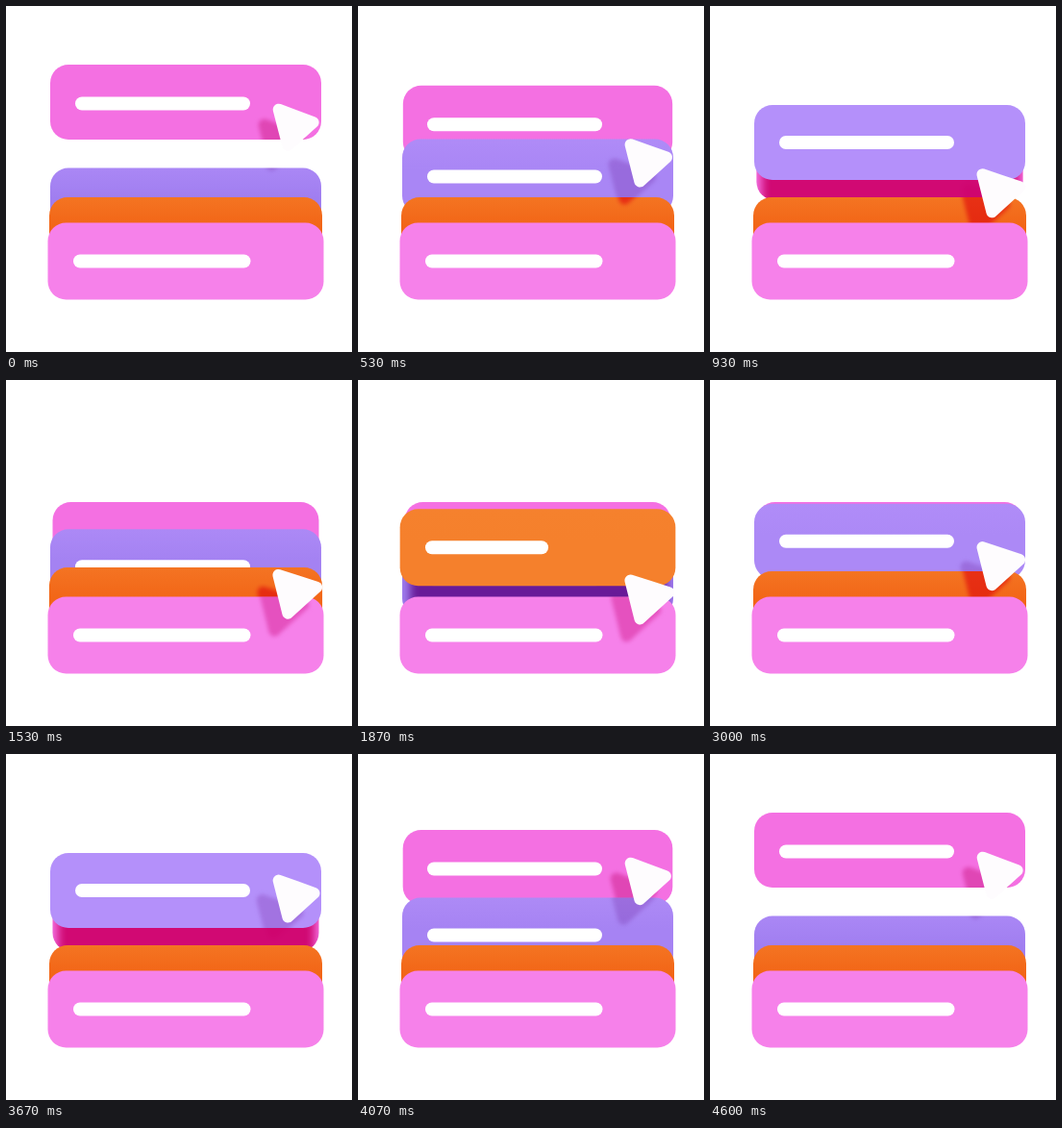
These frames come from a looping animation (360 px wide and 360 px high, 4670 ms). An HTML page with a canvas:

```html
<!DOCTYPE html>
<html lang="en">
<head>
<meta charset="utf-8">
<title>Card stack</title>
<style>
  html, body { margin: 0; width: 100%; height: 100%; overflow: hidden; background: #fff; }
  canvas { display: block; width: 360px; height: 360px; }
</style>
</head>
<body>
<canvas id="stage" width="360" height="360"></canvas>
<script>
const ctx = document.getElementById('stage').getContext('2d');
const LOOP = 4670;
const CENTER = 187;

const mix = (a, b, k) => a + (b - a) * k;
const mixColor = (a, b, k) => `rgb(${a.map((c, i) => Math.round(mix(c, b[i], k)))})`;
const ease = p => (1 - Math.cos(Math.PI * p)) / 2;
const progress = (t, from, to) => Math.min(1, Math.max(0, (t - from) / (to - from)));

// 0 at rest, 1 when moved: out during [a, b], back during [c, d]
const trip = (t, a, b, c, d) => ease(progress(t, a, b)) - ease(progress(t, c, d));

// Cards from back to front; glow is the pointer's shadow, cover the shadow of the next card
const cards = [
  { y0: 61, y1: 127, move: t => trip(t, 200, 1050, 3700, 4270),
    width: 282, grow: -5, height: 78, slot: [72, 254, 33.5],
    rest: [244, 112, 226], lit: [244, 112, 226],
    cover: 'rgba(206, 0, 106, .92)', glow: '#eba0cc', drop: [-15, 16] },
  { y0: 168.5, y1: 103, move: t => trip(t, 200, 900, 1250, 1650) + trip(t, 2700, 3230, 3720, 4270),
    width: 282, grow: 0, height: 78, slot: [72, 254, 32],
    rest: [160, 126, 240], lit: [180, 144, 250],
    cover: 'rgba(98, 16, 142, .9)', glow: '#e6cbe6', drop: [-17, 20.5] },
  { y0: 199, y1: 127, move: t => trip(t, 1450, 1980, 2680, 2990),
    width: 284, grow: 3, height: 80, slot: [70, 198, 33],
    rest: [242, 100, 22], lit: [245, 131, 46],
    glow: '#f26a9e', drop: [-16, 18] },
  { y0: 225.5, y1: 225.5, move: () => 0,
    width: 287, grow: 0, height: 80, slot: [70, 254.5, 33],
    rest: [246, 129, 234], lit: [246, 129, 234],
    glow: '#eea0d0', drop: [-14, 18], near: [172, 192] }
];

function pointerY(t) {
  const down = ease(Math.pow(progress(t, 100, 2000), 0.6));
  const up = ease(progress(t, 2040, 4450));
  return mix(101, 203, down - up);
}

function pointerPath(x, y, tall) {
  const pts = [[275, -3], [331 + 2 * tall, 18 - tall], [290, 55 + tall]];
  ctx.beginPath();
  ctx.moveTo(x + 303 + tall, y + 7.5 - tall / 2);
  for (let i = 1; i <= 3; i++) {
    const a = pts[i % 3], b = pts[(i + 1) % 3];
    ctx.arcTo(x + a[0], y + a[1], x + b[0], y + b[1], 6);
  }
  ctx.closePath();
}

function roundRect(x, y, w, h, r) {
  ctx.beginPath();
  ctx.roundRect(x, y, w, h, r);
}

function drawCard(card, front, pointer) {
  const { x, y, w, k, height, rest, lit } = card;
  const [left, right, top] = card.slot;
  const shade = ctx.createLinearGradient(0, y, 0, y + 32);
  shade.addColorStop(0, mixColor(rest, lit, (1 + k) / 2));
  shade.addColorStop(1, mixColor(rest, lit, k));

  ctx.save();
  roundRect(x, y, w, height, 19);
  ctx.fillStyle = shade;
  ctx.fill();
  ctx.clip();

  roundRect(left, y + top, right - left, 14, 7);
  ctx.fillStyle = '#fff';
  ctx.fill();

  ctx.save();
  ctx.globalCompositeOperation = 'multiply';
  ctx.globalAlpha = card.near ? progress(pointer.y, ...card.near) : 1;
  ctx.filter = 'blur(2px)';
  ctx.fillStyle = card.glow;
  pointerPath(card.drop[0], pointer.y + card.drop[1], pointer.tall);
  ctx.fill();
  ctx.restore();

  if (card.cover) {
    ctx.filter = 'blur(5px)';
    ctx.fillStyle = card.cover;
    ctx.fillRect(54, front.y + 40, 267, front.height - 10);
  }
  ctx.restore();
}

function draw(now) {
  const t = now % LOOP;
  const y = pointerY(t);
  const pointer = { y, tall: (y - 101) / 50 };

  for (const card of cards) {
    card.k = card.move(t);
    card.y = mix(card.y0, card.y1, card.k);
    card.w = card.width + card.grow * card.k;
    card.x = CENTER - card.w / 2;
  }

  ctx.fillStyle = '#fff';
  ctx.fillRect(0, 0, 360, 360);
  cards.forEach((card, i) => drawCard(card, cards[i + 1], pointer));

  pointerPath(0, y, pointer.tall);
  ctx.fillStyle = '#fefcfe';
  ctx.fill();
}

const start = performance.now();
function tick() {
  draw(performance.now() - start);
  requestAnimationFrame(tick);
}
tick();
</script>
</body>
</html>
```
